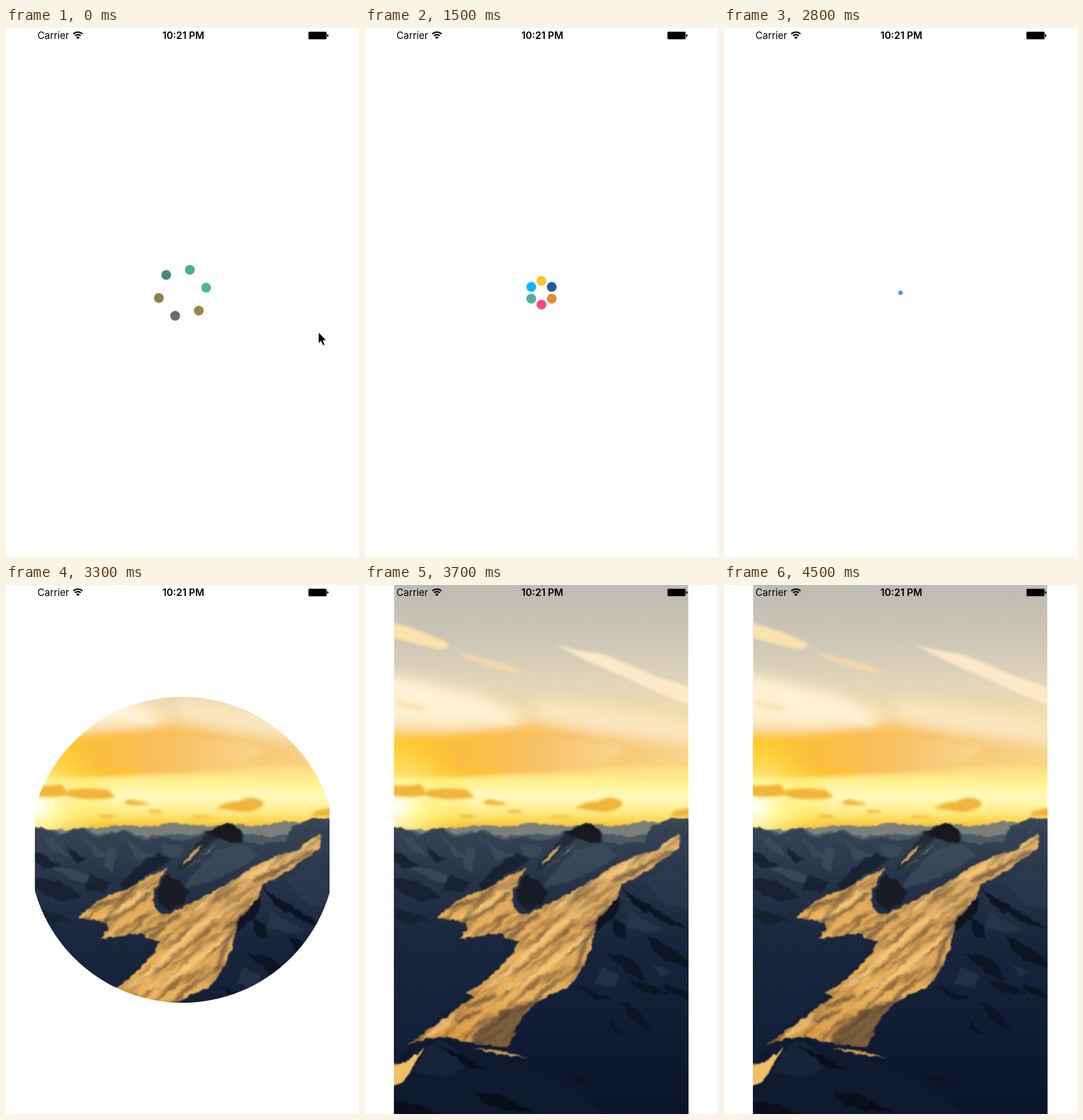
These frames come from a looping animation (611x917 px, 4.6 s). An HTML page:

```html
<!DOCTYPE html>
<html lang="en">
<head>
<meta charset="utf-8">
<title>Splash reveal</title>
<style>
  html, body { margin: 0; width: 100%; height: 100%; overflow: hidden; background: #fff; }
  svg { display: block; width: 611px; height: 917px; }
  text { font-family: Inter, Roboto, sans-serif; }

  .ring, .dot, .hole, .cursor { animation: 4600ms linear infinite; }
  .ring { animation-name: spin; }
  .dot { animation-name: travel, tint; fill: var(--c); }
  .hole { animation-name: open; }
  .cursor { animation-name: leave; animation-timing-function: step-end; }

  @keyframes spin {
    0% { transform: rotate(137.4deg); animation-timing-function: cubic-bezier(.3, .4, .6, 1); }
    26.087%, 100% { transform: rotate(360deg); }
  }
  /* Spread out, pull in, rest, merge, vanish */
  @keyframes travel {
    0% { transform: translateY(-41.8px); animation-timing-function: ease-out; }
    13.043% { transform: translateY(-67.5px); }
    21.739% { transform: translateY(-67.5px); animation-timing-function: ease-in; }
    26.087% { transform: translateY(-53px); }
    32.609% { transform: translateY(-20.5px); }
    53.261% { transform: translateY(-20.5px); animation-timing-function: ease-in; }
    58.696% { transform: translateY(0) scale(1); }
    60.87% { transform: translateY(0) scale(.38); }
    63.043%, 100% { transform: translateY(0) scale(0); }
  }
  @keyframes tint {
    0%, 2% { fill: var(--m); }
    13.043%, 100% { fill: var(--c); }
  }
  @keyframes open {
    0%, 66.196% { r: 0px; }
    78.261%, 100% { r: 575px; }
  }
  @keyframes leave {
    0% { opacity: 1; }
    6.522%, 100% { opacity: 0; }
  }
</style>
</head>
<body>
<svg viewBox="0 0 611 917">
  <defs>
    <clipPath id="hole"><circle class="hole" cx="305.5" cy="459" r="0"/></clipPath>
    <clipPath id="frame"><path d="M50.5 0H559.5V917H50.5z"/></clipPath>

    <linearGradient id="sky" gradientUnits="userSpaceOnUse" x1="0" y1="0" x2="0" y2="422">
      <stop offset="0" stop-color="#bdbbb3"/>
      <stop offset=".22" stop-color="#ccc6b7"/>
      <stop offset=".4" stop-color="#e2d5b8"/>
      <stop offset=".56" stop-color="#f7dfac"/>
      <stop offset=".74" stop-color="#fbd279"/>
      <stop offset=".8" stop-color="#fff08a"/>
      <stop offset=".87" stop-color="#fffabc"/>
      <stop offset=".93" stop-color="#ffec8a"/>
      <stop offset=".97" stop-color="#fdd64f"/>
      <stop offset="1" stop-color="#eeb244"/>
    </linearGradient>
    <linearGradient id="band" x1="0" x2="1" y1="0" y2="0">
      <stop offset="0" stop-color="#ffc82a"/>
      <stop offset=".3" stop-color="#fcbe40"/>
      <stop offset=".6" stop-color="#f8bf60"/>
      <stop offset="1" stop-color="#f8d795"/>
    </linearGradient>
    <radialGradient id="sun" gradientUnits="userSpaceOnUse" cx="55" cy="385" r="130">
      <stop offset="0" stop-color="#fff"/>
      <stop offset=".3" stop-color="#fff9a0" stop-opacity=".8"/>
      <stop offset="1" stop-color="#ffe030" stop-opacity="0"/>
    </radialGradient>
    <linearGradient id="land" gradientUnits="userSpaceOnUse" x1="0" y1="415" x2="0" y2="917">
      <stop offset="0" stop-color="#394655"/>
      <stop offset=".2" stop-color="#263347"/>
      <stop offset=".42" stop-color="#17253c"/>
      <stop offset=".75" stop-color="#0f1b33"/>
      <stop offset="1" stop-color="#0b142a"/>
    </linearGradient>
    <linearGradient id="gold" gradientUnits="userSpaceOnUse" x1="500" y1="440" x2="130" y2="800">
      <stop offset="0" stop-color="#dfb06a"/>
      <stop offset=".4" stop-color="#dda85c"/>
      <stop offset=".7" stop-color="#e9b25c"/>
      <stop offset="1" stop-color="#d99b46"/>
    </linearGradient>

    <path id="snow" d="M545 431L543 455L518 474L490 495L463 511L440 521L440 538L424 556L407 582L397 603L391 628L380 655L371 674L350 699L326 708L300 721L285 736L269 752L258 778L247 803L214 798L181 794L140 782L106 786L72 799L101 778L127 759L156 738L188 714L174 708L205 689L229 666L254 641L265 618L240 612L238 604L205 607L163 614L179 595L174 586L150 580L125 577L150 553L173 539L195 533L215 524L244 506L279 491L268 508L256 533L257 558L272 573L300 562L332 545L366 527L396 511L416 495L441 482L470 470L500 461L521 446z"/>
    <clipPath id="snowClip"><use href="#snow"/></clipPath>

    <filter id="wide" x="-20%" y="-60%" width="140%" height="220%"><feGaussianBlur stdDeviation="11"/></filter>
    <filter id="soft" x="-20%" y="-60%" width="140%" height="220%"><feGaussianBlur stdDeviation="5"/></filter>
    <filter id="blur" x="-20%" y="-40%" width="140%" height="180%"><feGaussianBlur stdDeviation="2.5"/></filter>
    <filter id="rough" filterUnits="userSpaceOnUse" x="40" y="390" width="530" height="540" color-interpolation-filters="sRGB">
      <feTurbulence type="fractalNoise" baseFrequency=".08" numOctaves="3" seed="4"/>
      <feDisplacementMap in="SourceGraphic" scale="9" xChannelSelector="R" yChannelSelector="G"/>
      <feGaussianBlur stdDeviation=".9"/>
    </filter>
    <!-- Streaks along the slope -->
    <filter id="grain" x="0" y="0" width="100%" height="100%" color-interpolation-filters="sRGB">
      <feTurbulence type="fractalNoise" baseFrequency=".014 .085" numOctaves="3" seed="9"/>
      <feColorMatrix values="0 0 0 0 .27  0 0 0 0 .2  0 0 0 0 .16  3.4 0 0 0 -1.5"/>
    </filter>
  </defs>

  <rect width="611" height="917" fill="#fff"/>

  <g clip-path="url(#hole)"><g clip-path="url(#frame)">
    <rect x="50" width="510" height="440" fill="url(#sky)"/>

    <!-- High clouds -->
    <g filter="url(#wide)">
      <path fill="#fff2d2" d="M30 152Q120 172 200 192L280 232Q200 250 30 235z"/>
      <path fill="#fae6c0" d="M300 200Q420 212 575 245V280Q420 258 300 228z"/>
      <path fill="url(#band)" d="M20 258Q170 266 285 240Q330 246 400 262L590 275V300L430 310L20 325z"/>
    </g>
    <g filter="url(#soft)">
      <path fill="url(#band)" d="M40 272L280 255L450 280Q430 312 330 323Q180 332 40 329z"/>
      <path fill="#f4d79a" d="M51 200L105 212L100 218L51 206z"/>
      <path fill="#fff3d4" d="M110 190Q200 205 265 243Q190 232 110 190z"/>
      <path fill="#ffe48c" opacity=".7" d="M380 325Q490 308 570 318V337Q480 338 380 325z"/>
    </g>
    <g filter="url(#blur)">
      <path fill="#fbe2ae" d="M45 65Q100 78 147 103Q138 115 120 110Q80 101 45 90z"/>
      <path fill="#f0d8a8" d="M158 117Q220 127 280 151Q250 154 225 145Q185 134 158 117z"/>
      <path fill="#fbe9c8" d="M329 102Q370 116 410 119Q450 135 500 157L565 178V210Q500 185 450 160Q390 137 329 102z"/>
      <path fill="#fdc236" d="M45 310L250 320Q180 335 45 331z"/>
    </g>
    <rect x="50" y="260" width="200" height="170" fill="url(#sun)"/>

    <!-- Low clouds -->
    <g fill="#f0b437" filter="url(#blur)">
      <path d="M48 347Q72 350 95 345Q105 354 108 364Q75 370 48 365z"/>
      <path d="M107 355Q145 350 176 355L190 368Q145 376 107 366z"/>
      <path d="M206 375Q215 369 225 374L249 379Q230 384 206 380z"/>
      <path d="M363 387Q385 374 402 376Q418 366 432 370Q448 373 445 382Q435 391 414 394Q390 390 363 387z"/>
      <path d="M246 390L270 391L271 395H250zM323 400L355 401L354 404H325zM535 392L562 386V401H528zM163 398L188 399V403H165z"/>
    </g>

    <g filter="url(#rough)">
      <!-- Distant ranges -->
      <path fill="#7b8078" d="M40 424L80 423L130 425L165 420L200 416L235 421L290 412L330 418L410 415L440 418L485 409L570 416V480H40z"/>
      <path fill="#4c5a66" d="M40 422L75 425L100 430L130 419L160 432L205 425L240 436L280 432L325 432L350 425L410 432L460 437L500 430L570 425V917H40z"/>
      <path fill="url(#land)" d="M40 424L62 421L90 434L132 421L158 438L204 426L235 442L275 437L310 445L350 427L385 413L407 425L413 443L440 450L482 443L497 419L533 403L570 405V930H40z"/>

      <!-- Hazy facets on the left -->
      <g fill="#42505f" opacity=".65">
        <path d="M62 432L88 445L108 471L78 459zM132 434L160 459L187 473L155 472zM207 437L235 460L266 469L225 477zM75 487L128 496L172 516L120 513zM175 455L192 458L185 500L170 486zM268 449L310 453L300 470L276 468z"/>
        <path d="M365 458L412 450L438 470L400 492L352 515L310 525L325 500z"/>
      </g>
      <g fill="#151f2e" opacity=".85">
        <path d="M51 461L95 486L68 491L51 481zM105 454L140 474L123 484zM51 507L95 514L130 540L100 550L51 529zM51 560L92 572L115 581L78 589L51 578zM147 502L182 516L168 533L135 529z"/>
        <path d="M262 464L289 476L240 503L208 532L195 520L230 487z"/>
      </g>

      <!-- Main peak -->
      <path fill="#232a35" d="M292 497L318 462L350 430L385 413L404 424L411 445L393 447L365 441L335 463L312 488z"/>
      <path fill="#17191d" d="M345 430L368 418L390 413L405 425L408 445L388 446L365 437z"/>
      <path fill="#c99f66" d="M364 449L338 473L306 494L333 477L352 462zM342 447L318 466L304 489L326 469z"/>

      <!-- Sunlit snow -->
      <use href="#snow" fill="url(#gold)"/>
      <path fill="#f0bf68" d="M45 832L78 823L103 799L93 822L67 861L45 872z"/>
      <path fill="#cf9c50" d="M185 803L219 805L284 820L240 815z"/>

      <g clip-path="url(#snowClip)">
        <g filter="url(#blur)" fill="none" stroke-linecap="round">
          <g stroke="#fbd184" stroke-width="9" opacity=".75">
            <path d="M535 443Q480 474 430 500T330 560M390 555Q330 590 280 640T215 695M376 613Q330 655 250 702M250 520Q205 561 168 575M155 748L110 778"/>
          </g>
          <g stroke="#4d3d33" stroke-width="6" opacity=".7">
            <path d="M530 462Q480 490 430 513M125 565L194 545L225 522M160 590L215 562L248 534M238 603L265 590L300 573M420 560L385 612L365 665M180 730L225 712M160 757L200 738"/>
          </g>
          <path fill="#3a3030" opacity=".6" d="M310 715L240 735L190 775L180 800L260 810z"/>
        </g>
        <rect x="-350" y="-200" width="700" height="400" transform="translate(305 615) rotate(-38)" filter="url(#grain)" opacity=".5"/>
      </g>

      <path fill="#171c27" d="M262 530L278 501L299 511L315 533L309 552L282 564L263 550z"/>
      <path fill="#1a2942" d="M51 590L105 581L150 592L163 613L238 610L258 622L235 655L178 708L115 760L72 799L51 835z" opacity=".35"/>

      <!-- Rocks on the shaded slope -->
      <g fill="#0d1423">
        <path d="M441 535L418 564L400 583L398 600L427 580L438 566zM431 577L451 590L453 613L437 611L427 593z"/>
        <path d="M443 524L479 548L525 574L560 597L520 586L465 555zM490 606L525 627L562 651V667L520 650L494 629z"/>
        <path d="M415 638L455 643L475 661L486 687L455 672zM365 692L405 710L433 721L395 717zM440 717L475 741L499 775L462 754zM455 683L505 698L527 711L479 705z"/>
        <path d="M420 751L458 784L431 774zM333 840L381 853L411 871L372 866zM520 690L560 710V718L520 702z"/>
      </g>
      <g fill="#303d52" opacity=".5">
        <path d="M480 508L530 490L570 520V565L520 553zM455 565L520 599L487 603L455 591zM410 660L440 676L435 699L397 690zM494 655L530 672L511 679z"/>
        <path d="M540 415L566 430V467L548 448zM499 431L530 414L524 436z"/>
      </g>

      <!-- Foreground -->
      <path fill="#101a2e" d="M40 890L77 848L103 797L127 784L165 796L208 816L270 832L350 868L430 930H40z"/>
      <path fill="#1b273c" d="M83 846L108 801L130 789L155 804L178 834L145 853z" opacity=".7"/>
      <path fill="#090e1b" d="M125 797L175 821L213 841L181 837zM190 879L237 884L292 913L245 911L207 900zM51 894L95 901L135 919H51z"/>
    </g>
  </g></g>

  <!-- Status bar -->
  <text x="54.5" y="19" font-size="16.8">Carrier</text>
  <text x="307" y="19" font-size="17" font-weight="600" text-anchor="middle">10:21 PM</text>
  <g fill="none" stroke="#000" stroke-width="2.4">
    <path d="M116.5 10.3A11.5 11.5 0 0 1 132.3 10.3M119.5 13.5A7 7 0 0 1 129.3 13.5"/>
    <path fill="#000" stroke="none" d="M124.4 19.2L121.3 16.1A4.4 4.4 0 0 1 127.5 16.1z"/>
  </g>
  <rect x="523.5" y="6.5" width="31.5" height="13" rx="2" fill="#000" stroke="#777"/>
  <path d="M556 10.5Q558.3 11 558.3 13T556 15.5z"/>

  <g transform="translate(305.5 459)"><g class="ring">
    <circle class="dot" r="8.6" style="--c:#fbc421;--m:#97874a"/>
    <g transform="rotate(60)"><circle class="dot" r="8.6" style="--c:#205b99;--m:#6d6c60"/></g>
    <g transform="rotate(120)"><circle class="dot" r="8.6" style="--c:#e08d31;--m:#957f4e"/></g>
    <g transform="rotate(180)"><circle class="dot" r="8.6" style="--c:#f5467f;--m:#3f8a7c"/></g>
    <g transform="rotate(240)"><circle class="dot" r="8.6" style="--c:#52ac98;--m:#45b08c"/></g>
    <g transform="rotate(300)"><circle class="dot" r="8.6" style="--c:#14b0ff;--m:#55b295"/></g>
  </g></g>

  <g class="cursor">
    <path d="M541 529L541 548L545.5 544L549 552L552.5 550.5L549.5 543H555z" fill="#aaa" opacity=".5"/>
    <path d="M541 527.5V546.5L545.3 542.6L548.6 550L551.6 548.7L548.6 541.3H554z" fill="#000" stroke="#fff" stroke-width=".7"/>
  </g>
</svg>
</body>
</html>
```
